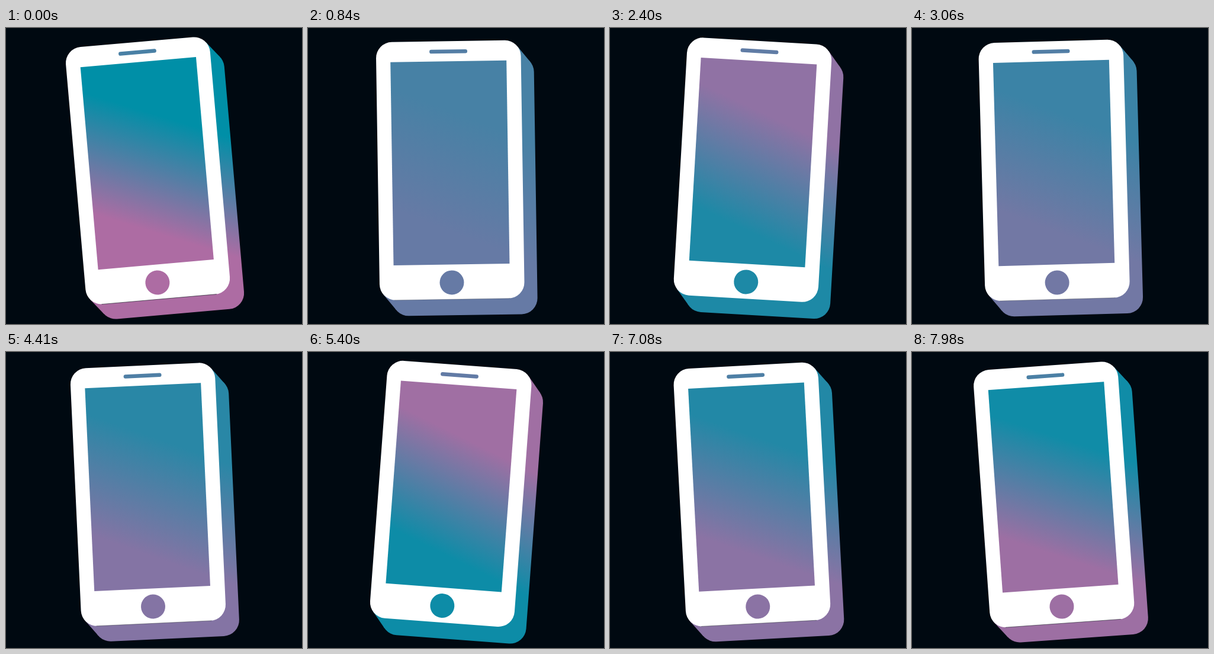
An HTML page for the animation above (8010 ms loop, 500 by 500 pixels).

```html
<!DOCTYPE html>
<html lang="en">
<head>
<meta charset="utf-8">
<title>Swinging phone</title>
<style>
  html, body { margin: 0; width: 100%; height: 100%; overflow: hidden; background: #000911; }
  svg { display: block; width: 100vw; height: 100vh; }
</style>
</head>
<body>
<!-- The origin is the pivot in the middle of the stage -->
<svg viewBox="-250 -250 500 500">
  <defs>
    <linearGradient id="fade" gradientUnits="userSpaceOnUse" x1="37.5" y1="-92.7" x2="-34.1" y2="84.4">
      <stop id="upper" offset="0"/>
      <stop id="lower" offset="1"/>
    </linearGradient>
  </defs>
  <g id="phone">
    <g fill="url(#fade)">
      <rect id="back" rx="27"/>
      <polygon id="sides"/>
    </g>
    <rect id="body" rx="27" fill="#fff"/>
    <path id="seam" d="M-107 208.1H88" fill="none" stroke="#000911" stroke-width=".7"/>
    <rect x="-107.8" y="-194" width="196" height="343.3" fill="url(#fade)"/>
    <rect id="speaker" x="-41.7" y="-213.8" width="64" height="6.5" rx="3.2"/>
    <circle cx="-9.8" cy="179.8" r="20.5" fill="url(#fade)"/>
  </g>
</svg>
<script>
  const LOOP = 8010, STEP = 30, SWING = 1905, TILT = 5;
  const TEAL = [0, 143, 167], PINK = [173, 108, 163];
  const box = { x: -131.9, y: -227.9, width: 244.6, height: 436 };
  const radius = 27, depth = { x: 21.7, y: 27 };
  const el = id => document.getElementById(id);
  const set = (id, attrs) => {
    for (const key in attrs) el(id).setAttribute(key, attrs[key]);
  };
  const mix = k => `rgb(${TEAL.map((v, i) => Math.round(v + (PINK[i] - v) * k))})`;

  function build() {
    set('body', box);
    set('back', { ...box, x: box.x + depth.x, y: box.y + depth.y });

    // Join the tangent points of two opposite corners on both faces
    const len = Math.hypot(depth.x, depth.y);
    const nx = depth.y / len * radius, ny = -depth.x / len * radius;
    const right = [box.x + box.width - radius + nx, box.y + radius + ny];
    const left = [box.x + radius - nx, box.y + box.height - radius - ny];
    const push = ([x, y]) => [x + depth.x, y + depth.y];
    set('sides', { points: [right, push(right), push(left), left].join(' ') });
  }

  function draw(time) {
    const t = Math.floor(time % LOOP / STEP) * STEP;
    const phase = t / SWING % 2;
    const u = phase < 1 ? phase : 2 - phase;
    const p = u * u * (3 - 2 * u);
    set('phone', { transform: `rotate(${(2 * p - 1) * TILT})` });
    set('upper', { 'stop-color': mix(p) });
    set('lower', { 'stop-color': mix(1 - p) });
    set('speaker', { fill: mix(0.42 + 0.16 * p) });
    set('seam', { opacity: Math.max(0, 0.8 - p) });
  }

  build();
  const start = performance.now();
  function tick() {
    draw(performance.now() - start);
    requestAnimationFrame(tick);
  }
  tick();
</script>
</body>
</html>
```
